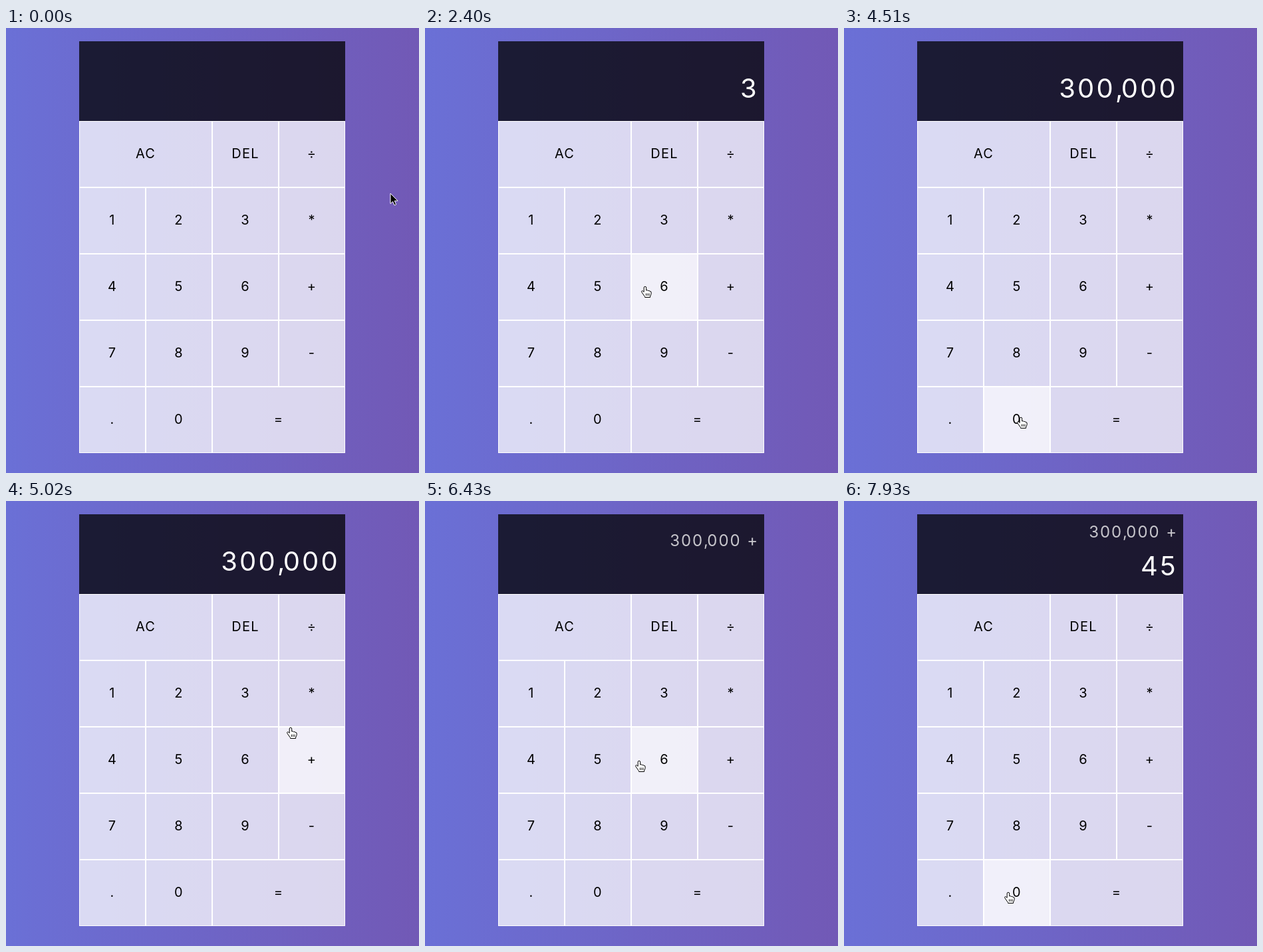
These frames come from a looping animation (621 px wide and 670 px high, 8000 ms). An HTML page:

```html
<!DOCTYPE html>
<html lang="en">
<head>
<meta charset="utf-8">
<title>Calculator</title>
<style>
  html, body { margin: 0; width: 100%; height: 100%; overflow: hidden; }
  body {
    position: relative;
    background: linear-gradient(to right, #667eea, #764ba2) -380px 0 / 1380px 100%;
    font: 20px Inter, sans-serif;
    letter-spacing: .06em;
  }
  #display {
    position: absolute; left: 110px; top: 20px; width: 400px; height: 120px;
    background: rgba(0, 0, 0, .75); color: #fff;
  }
  #display div {
    position: absolute; right: 8px; line-height: 40px; white-space: pre; letter-spacing: .08em;
  }
  #display i { font-style: normal; letter-spacing: -.07em; }
  #previous { font-size: 24px; opacity: .75; }
  #current { font-size: 40px; }
  .key {
    position: absolute; box-sizing: border-box; height: 100px;
    border: 1px solid #fff; background: rgba(255, 255, 255, .75); background-clip: padding-box;
    line-height: 96px; text-align: center;
  }
  .key.hover { background-color: rgba(255, 255, 255, .9); }
  #cursor { position: absolute; left: 0; top: 0; overflow: visible; }
</style>
</head>
<body>
<div id="display"><div id="previous"></div><div id="current"></div></div>
<svg id="cursor" width="1" height="1" stroke-linejoin="round">
  <path id="arrow" d="M0 0V15.5L3.6 12.2 6 17.8 8.6 16.7 6.2 11.2H11Z" stroke="#fff"/>
  <g id="hand" stroke="#000" fill="#fff">
    <path d="M-1.8 2A1.75 1.75 0 0 1 1.7 2V6Q3.2 5 4.5 6.6 6.1 5.8 7.1 7.4 9.1 7.1 9.1 9V11.5L7.6 15V16.5H-.4V15.5L-2.9 12-5.2 8.6Q-5.9 7-4.4 6.7-3.2 6.7-1.8 8.4Z"/>
    <path d="M1.5 10.5V14M3.8 10.5V14M6 10.5V14" stroke-width=".9"/>
  </g>
</svg>
<script>
const DURATION = 8000, STEP = 57;
const $ = id => document.getElementById(id);

// Pointer stops: time, x, y
const path = [
  [0, 578, 249], [900, 578, 249], [1230, 520, 252], [1410, 520, 252],
  [1640, 410, 280], [1810, 366, 284], [2180, 366, 284], [2670, 266, 586],
  [4450, 266, 586], [4570, 267, 587], [4690, 267, 587], [5020, 428, 341],
  [5140, 440, 312], [5430, 455, 396], [6100, 455, 396], [6430, 322, 391],
  [6830, 175, 428], [7130, 175, 428], [7240, 222, 404], [7320, 246, 402],
  [7570, 246, 402], [7870, 247, 591], [7930, 247, 589], [DURATION, 247, 589]
];

// Display states: time, current operand, previous operand
const entries = [
  [0, '', ''], [2230, '3', ''], [2910, '30', ''], [3140, '300', ''],
  [3320, '3,000', ''], [3620, '30,000', ''], [4100, '300,000', ''],
  [5850, '', '300,000 +'], [7070, '4', '300,000 +'], [7520, '45', '300,000 +']
];

const keys = [];
['AC AC DEL ÷', '1 2 3 *', '4 5 6 +', '7 8 9 -', '. 0 = ='].forEach((line, row) => {
  const labels = line.split(' ');
  labels.forEach((label, col) => {
    if (label === labels[col - 1]) return;
    const width = label === labels[col + 1] ? 200 : 100;
    const x = 110 + col * 100, y = 140 + row * 100;
    const el = document.createElement('div');
    el.className = 'key';
    el.textContent = label;
    el.style.cssText = `left:${x}px;top:${y}px;width:${width}px`;
    document.body.insertBefore(el, $('cursor'));
    keys.push({ el, x, y, width });
  });
});

function pointerAt(t) {
  const i = path.findLastIndex(p => p[0] <= t);
  const [t0, x0, y0] = path[i], [t1, x1, y1] = path[i + 1];
  const k = Math.floor((t - t0) / STEP) * STEP / (t1 - t0);
  return [x0 + (x1 - x0) * k, y0 + (y1 - y0) * k].map(Math.round);
}

function showNumber(id, text, centre) {
  $(id).innerHTML = text.replace(',', '<i>,</i>');
  $(id).style.top = centre - 40 + 'px';
}

function draw(t) {
  const [x, y] = pointerAt(t);
  let over = false;
  for (const key of keys) {
    const hit = x >= key.x && x < key.x + key.width && y >= key.y && y < key.y + 100;
    key.el.classList.toggle('hover', hit);
    over ||= hit;
  }
  $('cursor').style.transform = `translate(${x}px, ${y}px)`;
  $('arrow').style.display = over ? 'none' : '';
  $('hand').style.display = over ? '' : 'none';

  const [, current, previous] = entries.findLast(e => e[0] <= t);
  showNumber('current', current, previous ? 98 : 91);
  showNumber('previous', previous, current ? 47 : 60);
}

function tick() {
  draw(performance.now() % DURATION);
  requestAnimationFrame(tick);
}
tick();
</script>
</body>
</html>
```
